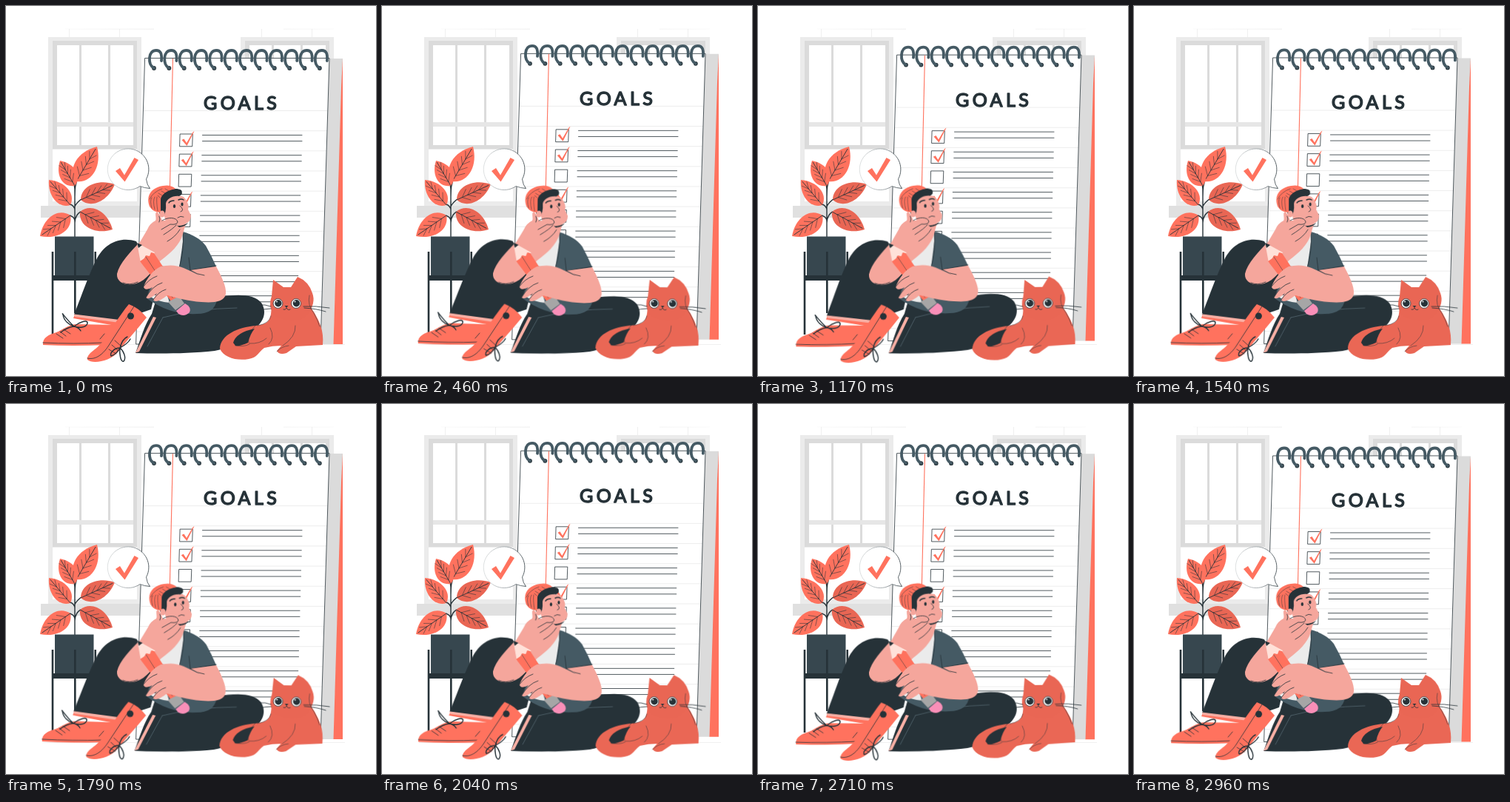
An HTML page that plays this animation: 500x500 px, repeating every 3 s.

```html
<!DOCTYPE html>
<html lang="en">
<head>
<meta charset="utf-8">
<title>Goals</title>
<style>
html, body { margin: 0; width: 100%; height: 100%; overflow: hidden; background: #fff; }
svg { display: block; width: 100vw; height: 100vh; }
.coral { fill: #ff725e; }
.deep { fill: #e96654; }
.dark { fill: #263238; }
.slate { fill: #455a64; }
.skin { fill: #f5a69c; }
.cat { fill: #ea6755; }
.line { fill: none; stroke: #263238; stroke-width: .8; stroke-linecap: round; stroke-linejoin: round; }
.thick { stroke-width: 1.4; }
.thin { stroke-width: .5; }
#person { transform-origin: 200px 364px; }
#cat { transform-origin: 363px 422px; }
.title { font: 400 25px Lato, "Open Sans", sans-serif; letter-spacing: 4.4px; fill: #263238; stroke: #263238; stroke-width: 1.5; stroke-linejoin: round; }
</style>
</head>
<body>
<svg viewBox="0 0 500 500">
<defs>
  <linearGradient id="fade">
    <stop offset="0" stop-color="#e0e0e0" stop-opacity=".2"/>
    <stop offset=".5" stop-color="#e0e0e0"/>
    <stop offset="1" stop-color="#e0e0e0" stop-opacity=".2"/>
  </linearGradient>
  <linearGradient id="rim">
    <stop offset="0" stop-color="#d5d8d9"/>
    <stop offset=".6" stop-color="#8b9397"/>
    <stop offset="1" stop-color="#263238"/>
  </linearGradient>
  <g id="window">
    <path fill="#ebebeb" d="M57 42H183V270H57Z"/>
    <path fill="#dbdbdb" d="M63 47H177V193H63Z"/>
    <path fill="#fff" d="M69 53H99V188H69ZM102 53H138V188H102ZM141 53H172V188H141ZM63 194H177V264H63Z"/>
    <path fill="#e6e6e6" d="M69 157H172V163H69Z"/>
    <path fill="#e0e0e0" d="M47 270H193V286H47Z"/>
    <path fill="none" stroke="#ededed" stroke-width=".8" d="M85.500 31V42M153.500 31V42"/>
  </g>
</defs>

<use href="#window"/>
<use href="#window" x="260"/>
<path fill="url(#fade)" d="M80 30.700H200V31.500H80ZM375 30.700H443V31.500H375Z"/>
<path fill="#ebebeb" d="M50 457H458V457.700H50Z"/>

<g id="pad">
  <path fill="#dbdbdb" d="M437 71H455L443 457H425Z"/>
  <path class="coral" d="M455 71V457H442.500L453 110Z"/>
  <path fill="#fff" d="M188 70.500H437L425 457H176Z"/>
  <g id="rules" fill="none" stroke="#e9e9e9" stroke-width=".8"></g>
  <path class="line" d="M188 70.500H437L425 457H176Z"/>
  <path fill="none" stroke="#ff725e" stroke-width="1.100" d="M225.500 71 216.500 457"/>
  <text class="title" x="267" y="140">GOALS</text>
  <g id="rows"></g>
  <g id="rings"></g>
</g>

<g id="plant">
  <path class="line thick" d="M93 312V243M93 252Q93 244 96 235M93 258Q94 249 92 240M93 276Q93 270 85 267M93 271Q95 266 103 260M93 293Q94 280 102 278M93 290Q92 284 85 283"/>
  <g id="leaves"></g>
  <path fill="#37474f" d="M66 311.500H118.500V364H66Z"/>
  <path class="dark" d="M62 364H122V371H62ZM61.700 332H64.300V444H61.700ZM119.500 332H122V371H119.500ZM92 332H94.600V415H92Z"/>
</g>

<g id="bubble">
  <path fill="#fff" stroke="url(#rim)" stroke-width=".8" d="M189.500 234A27.800 27.800 0 1 0 181 243.500Q187 246 194.500 246.500 190.500 242 189.500 234Z"/>
  <path class="coral" d="M148 223 154 219 160 228.500 173.500 205 179 208 160.500 237.500Z"/>
</g>

<g id="person">
  <!-- far leg and shoe -->
  <path class="coral" d="M93 417 153 424 148 432 91 422Z"/>
  <path class="dark" d="M92 417C102 392 113 360 122 343C133 320 155 311 176 318L205 372 196 410 152 425Z"/>
  <path fill="#f9b0a5" d="M92 416.500 153 424 150 427.500 93 420Z"/>
  <path class="coral" d="M50 458C49 448 58 444 68 441C78 437 85 430 96 430L148 431 134 458Q90 460 50 458Z"/>
  <path class="line" d="M50 455Q92 457 131 455M127 450 133 443M68 443 77 449M73 440 81 446M78 437 87 443"/>
  <path class="line thick" d="M92 433C82 424 74 412 77 417C78 425 85 431 92 433C99 427 111 423 110 429C108 435 99 435 92 433ZM92 433Q83 434 74 441M92 433Q98 434 101 439"/>
  <!-- near leg -->
  <path class="dark" d="M175 469C182 450 187 431 197 416L203 396 246 406 286 394C311 389 335 389 345 401C354 415 347 429 333 438C318 450 300 463 282 466C245 470 205 470 175 469Z"/>
  <path fill="#f9b0a5" d="M199 420 203 421 180 467 175 468.500Z"/>
  <path class="line" style="stroke:#53666f" d="M212 421Q257 409 312 408M212 421 191 460"/>
  <!-- near shoe -->
  <path class="coral" d="M110 478C109 469 122 465 130 454C142 438 154 417 166 403Q180 408 190 421C177 437 162 454 151 468C142 479 118 485 110 478Z"/>
  <path class="line" d="M110 476C122 479 132 469 138 460L173 406M139 464 149 470M143 458 152 466M147 452 156 460"/>
  <circle class="dark" cx="168.500" cy="419" r="4.500"/>
  <path class="line thick" d="M154 462C146 462 140 469 142 473C147 472 152 466 154 462C153 470 155 482 159 480C163 476 159 466 154 462ZM154 462Q157 450 164 447M154 462Q165 456 168 450"/>
  <!-- torso -->
  <path class="slate" d="M239 305C253 309 263 315 270 324Q278 338 284 352L274 357 285 397Q282 416 258 416 222 418 190 395L204 348Z"/>
  <path fill="#ebebeb" d="M231 307 239 305 239 319 234 354 226 354 202 350Z"/>
  <path fill="#ebebeb" d="M193 391 218 391 221 401Q202 399 193 391Z"/>
  <path class="line" d="M239 305Q241 331 234 354M249 357 247 340M249 357 284 351"/>
  <!-- head -->
  <path class="skin" d="M211 272 218 260C224 255 235 256 240 258C245 263 248 270 246 275L250 283Q250 291 243 294L239 308Q231 316 220 308Z"/>
  <path class="dark" d="M224 295Q235 300 246 293Q243 298 234 299Z"/>
  <path class="dark" d="M209 258C212 249 229 244 237 249Q240 254 234 257C225 256 217 261 216 267Q217 279 212 285L207 280Z"/>
  <path class="coral" d="M194 271C188 255 198 245 212 243Q223 241 229 247C217 249 210 255 209 261Q209 270 209 279 199 279 194 271Z"/>
  <path class="line thin" d="M197 273Q194 263 197 259M201 275Q198 263 201 258M205 277Q203 264 204 258M205 256 208 259M206 253 211 256M210 250 215 253M215 247 220 250M194 261Q199 251 211 247"/>
  <ellipse class="skin" cx="211" cy="281" rx="3.600" ry="4.600"/>
  <ellipse class="dark" cx="227.500" cy="270.500" rx="1.700" ry="2.500"/>
  <ellipse class="dark" cx="238" cy="268" rx="1.600" ry="2.400"/>
  <path class="line thick" d="M220 266Q222 263 227 263M233 262Q237 260 240 262"/>
  <path class="line" d="M235 270Q242 276 236 278M232 286Q236 283 240 285"/>
  <!-- raised arm -->
  <path class="skin" d="M181 319C168 332 153 348 150 362C149 374 163 379 176 375C190 371 199 356 209 344C222 334 235 323 239 308Q237 300 230 296C236 294 230 287 223 290L211 290Q208 281 204 278C200 279 204 287 202 290Q194 294 191 302Z"/>
  <path class="line" d="M207 284Q209 288 207 292M211 290C218 285 231 285 232 292Q231 296 222 295L210 302M230 296Q226 301 213 309M235 302Q229 312 218 318M178 373Q167 378 158 374"/>
  <!-- pencil -->
  <path fill="#ffe1d9" d="M177 320 201 333 197 341 189 338 182 347Z"/>
  <path class="dark" d="M177 320 184 323 179 327Z"/>
  <path class="coral" d="M181 345 187 341 189 337 194 338 196 333 200 334 240 394 227 404Z"/>
  <path class="line thin" d="M189 339 225 394"/>
  <path fill="#a6a6a6" d="M219 400 234 392 241 402 229 411Z"/>
  <path fill="#f98fb8" d="M230 412 242 402Q251 407 248 414 241 421 233 416Z"/>
  <!-- resting arm -->
  <path class="skin" d="M249 357 284 352C291 365 298 379 297 389C295 401 278 401 264 400C246 399 230 394 218 391C208 399 201 401 199 397L204 388Q193 398 189 394L198 380Q187 386 186 379C190 369 198 357 209 352Q226 348 240 354Q252 359 263 365Z"/>
  <path class="line" d="M186 379Q193 369 204 365M189 394Q198 378 211 374M199 397Q206 386 216 383M249 357Q258 363 268 364"/>
</g>

<g id="cat">
  <path class="cat" d="M358 416C356 429 349 430 337 432C314 434 290 444 289 463C294 475 312 480 328 477C340 475 341 468 349 462Q360 459 372 459L366 466Q369 472 379 469L392 460 428 458C430 438 423 426 417 415Q408 404 410 391L359 407Z"/>
  <path class="dark" d="M307 455Q311 441 336 436Q330 443 327 455Q317 460 310 459Z"/>
  <path class="deep" d="M359 392 361 370 375 380 385 380 394 366Q409 372 414 388Q419 401 408 416C399 430 371 427 361 416Q354 405 359 392Z"/>
  <path class="line thin" d="M410 391Q407 404 416 415 421 424 424 433M358 419Q356 429 340 432M337 432Q325 443 328 455M329 456Q343 457 352 449M310 459Q322 461 329 457M357 435Q364 449 355 457M391 432Q392 447 374 459M366 467Q372 460 382 459"/>
  <g id="eyes"></g>
  <path class="dark" d="M376.500 405H381.500L379 407.500Z"/>
  <path class="line" d="M379 408Q378 411 375 410M379 408Q381 412 384 410M402 406Q419 405 437 408M403 408Q420 409 432 413M358 406Q350 403 342 404M358 409Q349 409 341 412"/>
</g>
</svg>
<script>
const put = (id, markup) => document.getElementById(id).innerHTML = markup;
const repeat = (n, draw) => Array.from({ length: n }, (_, i) => draw(i)).join('');
const pitch = 27.15;

put('rules', repeat(12, i => {
  const y = 141.5 + pitch * i, shift = (y - 70) * .031;
  return `<path d="M${188 - shift} ${y}H${437 - shift}"/>`;
}));

put('rows', repeat(9, i => {
  const tick = [0, 1, 3].includes(i)
    ? '<path class="coral" d="M237.500 181 240.500 179.500 244 185 252.500 170.500 254.500 169 244.500 189Z"/>' : '';
  return `<g transform="translate(${-.75 * i} ${pitch * i})">
    <path class="line" d="M265.500 174.500H400M265.500 182.600H400"/>
    <path class="line" d="M235.500 173H252.300L251.700 189.800H235Z"/>${tick}</g>`;
}));

put('rings', repeat(12, i => `<g transform="translate(${20.35 * i} 0)">
  <circle class="dark" cx="200" cy="84" r="2.900"/>
  <path fill="none" stroke="#455a64" stroke-width="3.800" stroke-linecap="round"
    d="M200 84C194.500 81 193.500 76 194 70C194.500 63.500 198 60 203 60C208.500 60 211 64 210 74"/></g>`));

// Each leaf: base point, tip point, half width, fill
const leaves = [
  [95, 237, 123, 190, 15, 'coral'], [93, 243, 73, 209, 12, 'coral'], [87, 269, 58, 235, 12, 'coral'],
  [101, 262, 147, 241, 13, 'deep'], [100, 278, 144, 302, 14, 'deep'], [87, 283, 46, 311, 14, 'coral']
];
put('leaves', leaves.map(([x, y, tx, ty, w, fill]) => {
  const len = Math.hypot(tx - x, ty - y);
  const turn = Math.atan2(ty - y, tx - x) * 180 / Math.PI;
  const veins = repeat(4, i => {
    const a = len * (.16 + .16 * i), h = w * (.6 - .08 * i);
    return `M${a} 0L${a + 9} ${-h}M${a} 0L${a + 9} ${h}`;
  });
  return `<g transform="translate(${x} ${y}) rotate(${turn})">
    <path class="${fill}" d="M0 0C${len * .15} ${-w * 1.3} ${len * .65} ${-w * 1.3} ${len} 0C${len * .65} ${w * 1.3} ${len * .15} ${w * 1.3} 0 0"/>
    <path class="line" d="M0 0H${len * .93}"/>
    <path class="line thin" d="${veins}"/></g>`;
}).join(''));

put('eyes', [367.5, 392].map(x => `
  <circle cx="${x}" cy="402" r="6.400" fill="#fff" stroke="#263238" stroke-width=".8"/>
  <circle class="dark" cx="${x + .4}" cy="401.700" r="4.700"/>
  <circle cx="${x - 1.5}" cy="399.500" r=".9" fill="#fff"/>`).join(''));

const loop = { duration: 1500, iterations: Infinity, easing: 'linear' };
const sway = [
  { transform: 'rotate(0deg)', offset: 0 },
  { transform: 'rotate(1deg)', offset: .25 },
  { transform: 'rotate(-1deg)', offset: .75 },
  { transform: 'rotate(0deg)', offset: 1 }
];
const float = [0, -10, 0].map(y => ({ transform: `translateY(${y}px)` }));
const play = (id, steps) => document.getElementById(id).animate(steps, loop).startTime = 0;

play('pad', float);
play('person', sway);
play('cat', sway);
</script>
</body>
</html>
```
